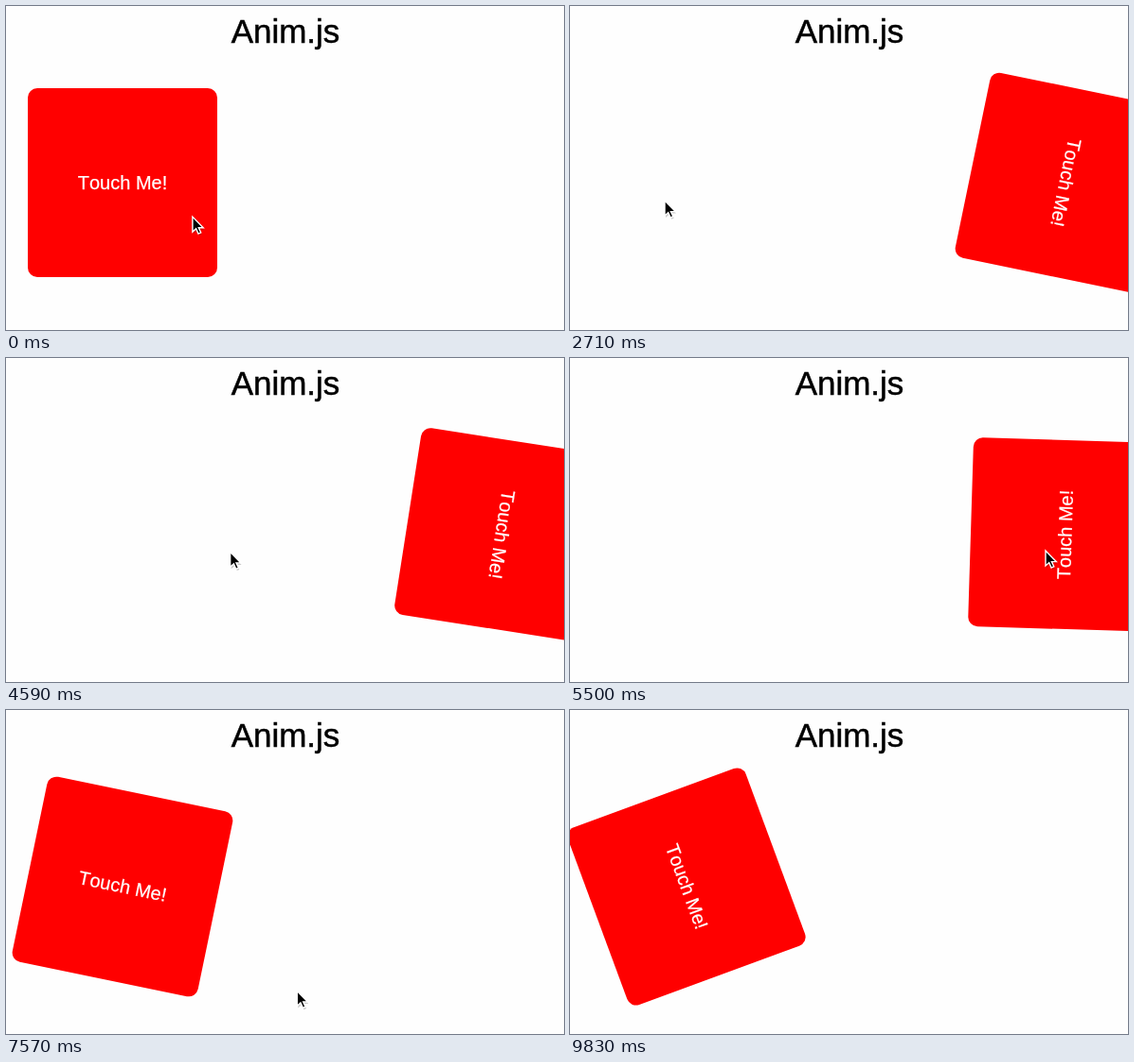
Animation of 589x343 px, one loop 9930 ms. Source, as an HTML page:

```html
<!DOCTYPE html>
<html lang="en">
<head>
<meta charset="utf-8">
<title>Anim.js</title>
<style>
  html, body { margin: 0; width: 100%; height: 100%; overflow: hidden; background: #fefefe; }
  svg { display: block; width: 589px; height: 343px; }
  text { font-family: "Liberation Sans", Helvetica, Arial, sans-serif; font-kerning: none; text-anchor: middle; }
</style>
</head>
<body>
<svg viewBox="0 0 589 343">
  <text x="295" y="39" font-size="35" stroke="#000" stroke-width=".5">Anim.js</text>
  <g id="box">
    <rect x="-100" y="-100" width="200" height="200" rx="10" fill="#f00"/>
    <text y="6.5" font-size="20" fill="#fff" stroke="#fff" stroke-width=".25">Touch Me!</text>
  </g>
  <g id="cursor">
    <path d="M1 2V18L4.8 14.6L7.2 19.8L9.8 18.6L7.4 13.6H12Z" fill="#000" opacity=".2"/>
    <path d="M0 0V16L3.7 12.6L6.1 18L8.8 16.8L6.4 11.6H11.3Z" fill="#000" stroke="#fff" stroke-width="1.4"/>
  </g>
</svg>
<script>
const LOOP = 9930, SLIDE = 500;
const LEFT = 123, RIGHT = 523, MIDDLE = 187;

const linear = p => p;
const easeIn = p => p * p;
const easeOut = p => 1 - (1 - p) ** 2;
const progress = (t, start, end) => Math.min(1, Math.max(0, (t - start) / (end - start)));

// Each touch slides the box across and restarts its spin (degrees per ms).
const touches = [
  { at: 2176, from: LEFT, to: RIGHT, speed: 0.19 },
  { at: 5562, from: RIGHT, to: LEFT, speed: 0.185 }
];

const home = { x: 197, y: 223 };
const moves = [
  { start: 0, end: 350, x: 183, y: 240, ease: easeOut },
  { start: 350, end: 1000, x: 124, y: 187, ease: linear },
  { start: 1000, end: 1610, x: 100, y: 206, ease: easeOut },
  { start: 3320, end: 5500, x: 502, y: 204, ease: easeIn },
  { start: 6200, end: 8270, x: 208, y: 345, ease: linear }
];

function boxTransform(t) {
  const touch = t < touches[1].at ? touches[0] : touches[1];
  const elapsed = Math.max(0, t - touch.at);
  const x = touch.from + (touch.to - touch.from) * easeOut(progress(elapsed, 0, SLIDE));
  return `translate(${x} ${MIDDLE}) rotate(${elapsed * touch.speed})`;
}

function cursorTransform(t) {
  let { x, y } = home;
  for (const move of moves) {
    const p = move.ease(progress(t, move.start, move.end));
    x += (move.x - x) * p;
    y += (move.y - y) * p;
  }
  return `translate(${x} ${y})`;
}

const box = document.getElementById("box");
const cursor = document.getElementById("cursor");
const origin = performance.now();

function tick() {
  const t = (performance.now() - origin) % LOOP;
  box.setAttribute("transform", boxTransform(t));
  cursor.setAttribute("transform", cursorTransform(t));
  requestAnimationFrame(tick);
}
tick();
</script>
</body>
</html>
```
